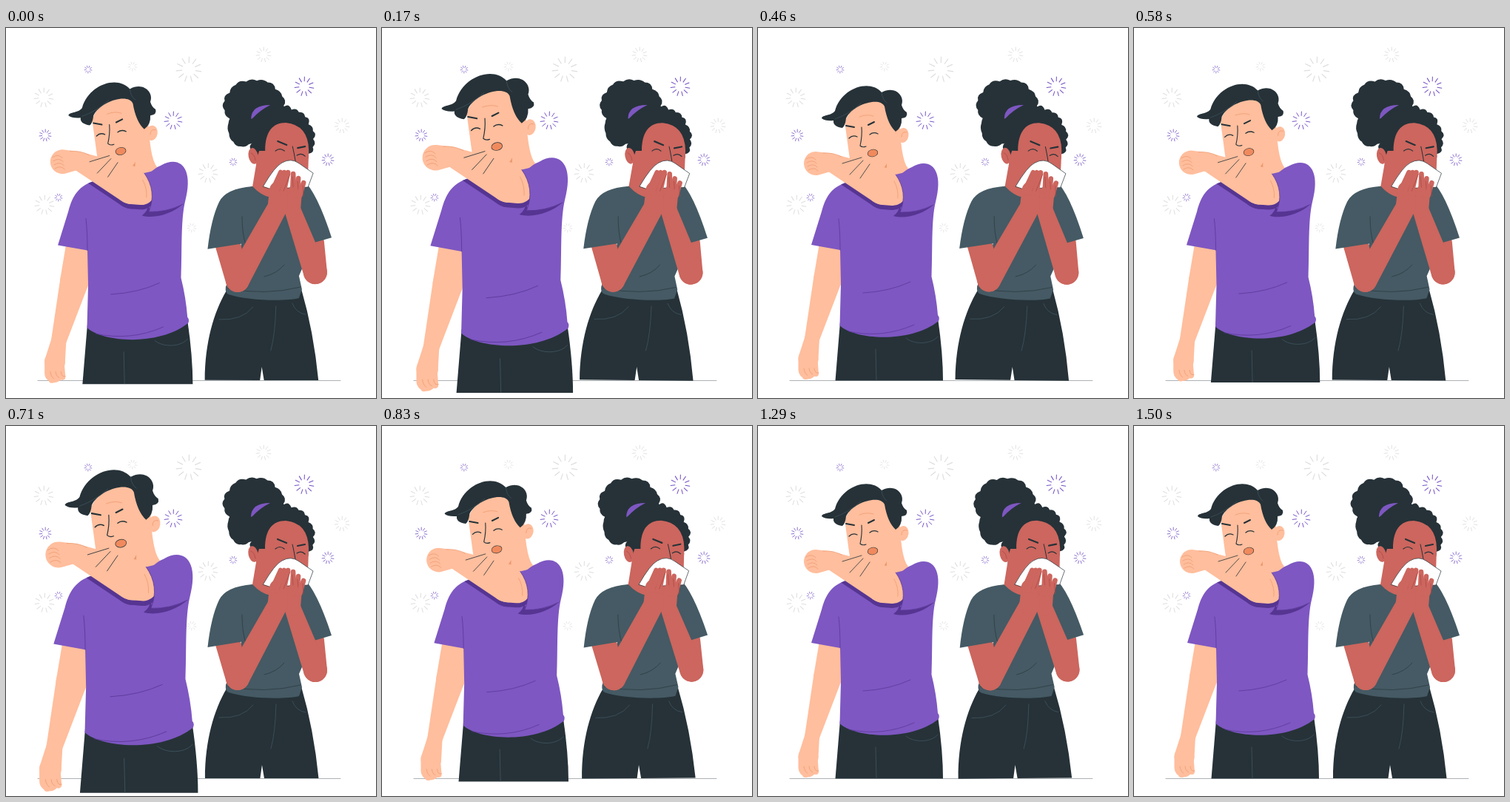
These frames come from a looping animation (500 px wide and 500 px high, 1.54 s). An HTML page with a canvas:

```html
<!DOCTYPE html>
<html lang="en">
<head>
<meta charset="utf-8">
<title>Cough and sneeze</title>
<style>
  html, body { margin: 0; width: 100%; height: 100%; overflow: hidden; background: #fff; }
  canvas { display: block; width: 500px; height: 500px; }
</style>
</head>
<body>
<canvas id="stage"></canvas>
<script>
const canvas = document.getElementById('stage');
const ctx = canvas.getContext('2d');
const ratio = window.devicePixelRatio || 1;
canvas.width = canvas.height = 500 * ratio;

const LOOP = 1540, STEP = 1000 / 24, CYCLE = 1500, LEAD = 36;
const TAU = 2 * Math.PI;
const DARK = '#263238', SLATE = '#455a64', PURPLE = '#7e57c2', SHADE = '#563592';
const PEACH = '#ffbe9d', ORANGE = '#eb996e', BROWN = '#cc665e', MAROON = '#a94743';

function fill(path, color) {
  ctx.fillStyle = color;
  ctx.fill(new Path2D(path));
}

function line(path, color = DARK, width = 0.7) {
  ctx.strokeStyle = color;
  ctx.lineWidth = width;
  ctx.stroke(new Path2D(path));
}

function oval(x, y, rx, ry, tilt, color) {
  ctx.fillStyle = color;
  ctx.beginPath();
  ctx.ellipse(x, y, rx, ry, tilt, 0, TAU);
  ctx.fill();
}

// Chain of tapered round segments; each joint is [x, y, radius].
function limb(color, ...joints) {
  ctx.fillStyle = color;
  for (let i = 1; i < joints.length; i++) {
    const [x, y, r] = joints[i - 1], [u, v, s] = joints[i];
    const a = Math.atan2(v - y, u - x);
    const b = Math.acos((r - s) / Math.hypot(u - x, v - y));
    ctx.beginPath();
    ctx.arc(x, y, r, a + b, a - b + TAU);
    ctx.arc(u, v, s, a - b, a + b);
    ctx.fill();
  }
}

// Ellipse with a scalloped, slightly irregular rim.
function curls(x, y, rx, ry, count) {
  const rim = (i, grow) => {
    const a = i * TAU / count;
    const k = grow + 0.03 * Math.sin(Math.floor(i) % count * 2.4);
    return [x + rx * k * Math.cos(a), y + ry * k * Math.sin(a)];
  };
  ctx.beginPath();
  ctx.moveTo(...rim(0, 0.95));
  for (let i = 0; i < count; i++) ctx.quadraticCurveTo(...rim(i + 0.5, 1.07), ...rim(i + 1, 0.95));
  ctx.fillStyle = DARK;
  ctx.fill();
}

function burst(x, y, radius, color) {
  const rays = radius < 7 ? 9 : 11;
  ctx.strokeStyle = color;
  ctx.lineWidth = 0.5 + radius * 0.04;
  ctx.beginPath();
  for (let i = 0; i < rays; i++) {
    const a = (i + 0.3) * TAU / rays;
    const c = Math.cos(a), s = Math.sin(a);
    ctx.moveTo(x + c * radius * 0.55, y + s * radius * 0.55);
    ctx.lineTo(x + c * radius, y + s * radius);
  }
  ctx.stroke();
}

function drawBackdrop() {
  const grey = (x, y, r) => burst(x, y, r, '#dedede');
  const violet = (x, y, r) => burst(x, y, r, '#7350c4');
  grey(51, 94, 13);
  grey(52, 239, 13);
  grey(273, 196, 13);
  grey(247, 56, 17);
  grey(348, 36, 10);
  grey(454, 132, 10);
  grey(171, 52, 6);
  grey(251, 270, 6);
  violet(403, 79, 13);
  violet(226, 125, 12);
  violet(53, 145, 8);
  violet(435, 178, 8);
  violet(111, 56, 5);
  violet(307, 181, 5);
  violet(71, 229, 5);
  line('M43 476.5H452', '#59646a', 0.5);
}

function drawMan() {
  // Hanging arm
  limb(PEACH, [98, 292, 15], [94, 340, 19], [73, 420, 10], [68, 447, 13.5], [67, 462, 12.5]);
  for (let i = 0; i < 3; i++) {
    const x = 62 + i * 7;
    limb(PEACH, [x, 455, 5], [x + 2, 471 - i * 2, 4]);
    line(`M${x} 460q1 8 6 ${10 - i * 2}`, ORANGE);
  }

  // Trousers
  fill('M111 397L104.500 476.500H250Q250 440 243 392Z', DARK);
  line('M159 434L160 476M200 419C210 428 234 428 243 417', SLATE);

  // Shirt
  const shirt = 'M126 207C98 213 91 230 86 248L72 293L111 300L112 346L110.500 402C130 421 205 427 244 396Q246 391 243 388Q241 362 234.500 336C236 300 234 260 240 235C252 190 232 174 208 188L186 198Z';
  fill(shirt, PURPLE);
  line('M109 258Q111 275 111 300M142 358Q178 356 206 343M122 410Q168 420 211 401', SHADE);

  // Face and neck
  oval(196, 145, 7.5, 10, 0.15, PEACH);
  fill('M117 126L124 177L150 203H186L203 190Q192 178 191 112L160 90L130 104Z', PEACH);
  line('M194 147Q194 139 201 141M137 120Q147 116 156 119', ORANGE);
  fill('M164 193Q171 190 174 183V195Z', ORANGE);

  // Raised arm with its shadow on the shirt
  const arm = [[78, 183, 16], [98, 181.5, 12], [170, 214, 25], [182, 221, 19]];
  ctx.save();
  ctx.clip(new Path2D(shirt));
  ctx.translate(0, 6);
  limb(SHADE, ...arm);
  ctx.restore();
  limb(PEACH, ...arm);
  for (let i = 0; i < 4; i++) line(`M${65 + i} ${177 + i * 5}q8 -5 13 1`, ORANGE);
  line('M88 169Q102 168 113 174M184 207Q190 218 189 230', ORANGE);
  fill('M183 254Q191 248 191 240L194 248Q218 250 237 239C224 251 200 259 183 254Z', SHADE);
  fill('M186 198Q203 222 192 249Q215 250 237 239L238 205L220 190Z', PURPLE);
  line('M186 198Q203 222 192 249Q215 250 237 239', SHADE);

  // Hair
  fill('M86 122C87 117 99 119 104 112C112 82 150 68 167 87C185 77 199 92 194 104Q196 111 201 114Q203 121 194 122Q195 134 186 140Q175 130 171 106C165 92 128 103 119 122Q118 132 114 135Q101 133 102 125Q91 126 86 122Z', DARK);
  line('M104 123Q122 117 139 102M167 87Q168 97 174 101', SLATE, 0.6);

  // Features
  line('M119 132L130 134M149 131L157 127', DARK, 2);
  line('M123 149Q128 144 134 147M151 144Q156 140 162 143', DARK, 1.3);
  line('M140 134Q141 146 138 159Q141 162 146 160', DARK, 1.1);
  oval(155, 169, 7.2, 5.2, -0.2, DARK);
  oval(155, 169, 6.6, 4.6, -0.2, '#f08a5d');
  line('M140 175L114 183M142 179L124 198M151 184L138 203', DARK, 0.8);
}

function drawWoman() {
  // Trousers
  fill('M298 355C281 384 269 425 269 476H343.500L346 458L349 476H422.500Q416 410 399 352Z', DARK);
  line('M288 394Q319 396 334 377M387 372Q392 385 405 387M365 376Q364 415 358 436', SLATE);

  // Hair bun
  curls(335, 105, 42, 36, 17);
  curls(320, 136, 21, 25, 11);

  // Shirt body and neck
  fill('M333 214L300 225L318 292L297 350Q296 358 301 360C325 368 375 370 396 365L400 353L396 335L415 291L402 206Z', SLATE);
  line('M300 352Q350 362 398 350M349 336Q366 332 376 320', DARK, 0.6);
  fill('M339 178L333 214Q345 227 358 229L398 225V195Z', BROWN);

  // Upper arms and sleeves
  const leftElbow = [313, 341, 16], rightElbow = [418, 330, 16];
  limb(BROWN, [299, 290, 17], leftElbow);
  limb(BROWN, [415, 290, 15], rightElbow);
  fill('M333 214Q297 217 288 235Q277 258 272.500 299L322 291V225Z', SLATE);
  fill('M402 206Q420 222 440 283L413 291L385 250V220Z', SLATE);
  line('M319 255Q319 278 324 293', DARK, 0.6);

  // Head
  curls(373, 150, 44, 45, 25);
  oval(334, 173, 6.5, 11, -0.2, BROWN);
  fill('M350 166C350 140 360 128 378 128Q408 131 409 165L408 198L368 218Q338 222 338 178L342 166Z', BROWN);
  line('M331 169Q336 171 337 179', MAROON);
  fill('M331 123Q331 104 357 104Q343 111 333 122Z', PURPLE);
  line('M367 153L379 158M394 162L404 160', DARK, 2.2);
  line('M364 166Q370 161 376 166M393 172Q399 168 404 173', DARK, 1.2);
  line('M387 160Q389 168 391 180', DARK, 1);

  // Tissue
  const tissue = 'M347.500 214Q363 187 373 182Q385 175 396 183L415 196L408 215L356 217Z';
  fill(tissue, '#fff');
  line(tissue);

  // Forearms, palms and fingers
  limb(BROWN, rightElbow, [387, 245, 11], [391, 220, 9]);
  limb(BROWN, leftElbow, [367, 242, 13.5], [368, 219, 12]);
  for (let i = 0; i < 3; i++) {
    const left = [371 + i * 5, 195], right = [388 + i * 7, 197 + i * 6];
    limb(BROWN, [360 + i * 7, 222, 4.5], [...left, 3.3]);
    limb(BROWN, [388 + i * 4, 226, 4.5], [...right, 3.3]);
    line(`M${left[0] + 3} 197l-9 23`, MAROON);
    line(`M${right[0] - 1} ${right[1] + 4}l1 14`, MAROON);
  }
}

// Linear rise from a to b, then linear fall to c.
function pulse(p, a, b, c) {
  return Math.max(0, Math.min((p - a) / (b - a), (c - p) / (c - b)));
}

function beatScale(p) {
  return 1 + 0.1 * (pulse(p, 0, 0.1, 0.3) + pulse(p, 0.4, 0.5, 0.6));
}

// Triangle wave of one degree to each side.
function swayAngle(p) {
  return Math.asin(Math.sin(p * TAU)) / 90;
}

function around(x, y, transform, draw) {
  ctx.save();
  ctx.translate(x, y);
  transform();
  ctx.translate(-x, -y);
  draw();
  ctx.restore();
}

function render(now) {
  const tick = Math.floor((now % LOOP + 5) / STEP);
  const p = Math.min(LEAD + tick * STEP, CYCLE) / CYCLE;
  const scale = beatScale(p);
  ctx.setTransform(ratio, 0, 0, ratio, 0, 0);
  ctx.fillStyle = '#fff';
  ctx.fillRect(0, 0, 500, 500);
  ctx.lineCap = ctx.lineJoin = 'round';
  drawBackdrop();
  around(355, 272, () => ctx.rotate(swayAngle(p)), drawWoman);
  around(152, 277, () => ctx.scale(scale, scale), drawMan);
  requestAnimationFrame(render);
}

requestAnimationFrame(render);
</script>
</body>
</html>
```
